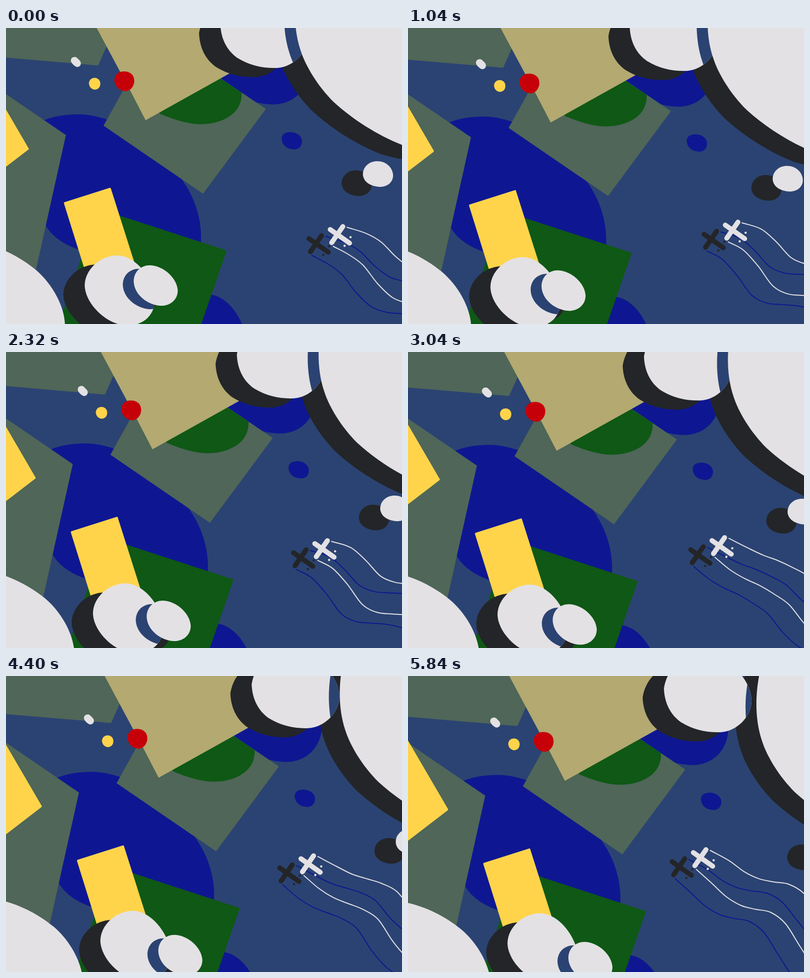
These frames come from a looping animation (800x600 px, 5.92 s). An HTML page with a canvas:

```html
<!DOCTYPE html>
<html lang="en">
<head>
<meta charset="utf-8">
<title>Planes over islands</title>
<style>
  html, body { margin: 0; width: 100%; height: 100%; overflow: hidden; background: #2b4372; }
  canvas { display: block; }
</style>
</head>
<body>
<canvas id="stage" width="800" height="600"></canvas>
<script>
const ctx = document.getElementById('stage').getContext('2d');
const STEP = 80, STEPS = 74, WAVE_STEPS = 16;
const SEA = '#2b4372', BLUE = '#0e1791', SAGE = '#4f6658', GREEN = '#0f5815',
      TAN = '#b3a971', YELLOW = '#ffd44b', RED = '#c60009', WHITE = '#e3e1e4', DARK = '#232528';

const shape = (color, d, round = 0) => ({ color, path: new Path2D(d), round });

const ground = [
  shape(BLUE, 'M150 175C240 178 330 260 365 322C385 355 396 395 394 435C390 470 200 470 147 449C110 437 85 415 75 390C40 300 30 200 82 185C105 177 125 175 150 175Z'),
  shape(BLUE, 'M612 80C612 125 580 155 540 155C500 155 425 130 425 90L500 20L612 60Z'),
  shape(BLUE, 'M400 540C440 536 475 575 490 640H380Z'),
  shape(BLUE, 'M557 226C556 214 566 211 575 211C588 211 599 220 598 231C597 243 588 247 580 246C568 245 558 238 557 226Z'),
  shape(SAGE, 'M-60 55L186 76L235 -34H-60Z'),
  shape(SAGE, 'M-60 93L121 217L30 628H-60Z'),
  shape(SAGE, 'M197 198L398 336L525 164L320 25H293Z'),
  shape(GREEN, 'M311 174C345 188 370 195 395 195C440 194 478 172 476 131L430 100L300 150Z'),
  shape(TAN, 'M148 -66L251 127L282 187L500 65L470 -80Z'),
  shape(GREEN, 'M187 368L444 452L379 640H95Z', 3),
  shape(YELLOW, 'M-60 66L44 245L-60 325Z', 4),
  shape(YELLOW, 'M119 355L210 326L267 506H166Z', 4),
  shape(WHITE, 'M131 66C131 59 139 57 143 60L149 66C154 72 150 79 144 79C140 79 131 71 131 66Z'),
  shape(YELLOW, 'M167.500 112C168 104 174 101 180 101C187 102 191 107 190.500 114C190 121 185 125 179 125C172 124 168 119 167.500 112Z'),
  shape(RED, 'M219 105C220 94 227 88 238 88C250 88 258 94 259 105C260 116 253 127 242 128C231 128 219 119 219 105Z'),
];

// Each cloud drifts by its own vector over one loop.
const cloud = (dx, dy, d) => ({ dx, dy, path: new Path2D(d) });
const topCloud = cloud(84, 33, 'M433 -8C434 20 445 45 468 61C492 76 520 82 548 81C580 79 610 50 610 17C609 -10 595 -30 580 -45C540 -95 445 -85 433 -8Z');
const cornerCloud = cloud(120, 86, 'M590 -90C582 -50 580 0 595 45C605 77 630 118 662 150C700 185 750 217 800 237C830 246 850 250 880 250V-120H620Z');
const leftCloud = cloud(48, 24, 'M-80 431C-20 436 30 465 60 490C95 520 118 565 119 600C121 615 121 640 118 660H-80Z');
const lowCloud = cloud(42, 20, 'M159 522C159 490 190 461 225 461C262 461 300 510 301 550C300 585 275 603 245 603C205 603 160 560 159 522Z');
const puff = cloud(66, 58, 'M258 514C258 492 275 480 292 481C318 482 346 507 347 532C347 552 330 564 312 563C285 561 259 540 258 514Z');
const rightPuff = cloud(88, 53, 'M721 297C721 280 735 270 750 270C768 270 782 283 782 300C781 315 768 322 755 322C736 321 722 312 721 297Z');
const clouds = [topCloud, cornerCloud, leftCloud, lowCloud, puff, rightPuff];

// Trail depth at every 30 px behind the plane, at key phases of the wave.
const waveKeys = [
  [0,      [0, 16, 38, 76, 104, 115, 118, 119, 121, 125]],
  [0.125,  [0, 21, 35, 57, 98, 125, 132, 134, 134, 136]],
  [0.4375, [0, 26, 45, 57, 69, 89, 134, 168, 187, 202]],
  [0.5625, [0, 27, 55, 73, 81, 87, 110, 157, 201, 218]],
  [0.84,   [0, 15, 48, 91, 108, 111, 111, 113, 122, 140]],
];
waveKeys.push([1, waveKeys[0][1]]);

function waveAt(phase) {
  const i = waveKeys.findIndex(key => key[0] > phase);
  const [from, a] = waveKeys[i - 1], [to, b] = waveKeys[i];
  const k = (phase - from) / (to - from);
  return a.map((y, j) => y + (b[j] - y) * k);
}

function moved(dx, dy, draw) {
  ctx.save();
  ctx.translate(dx, dy);
  draw();
  ctx.restore();
}

function fill(path, color) {
  ctx.fillStyle = color;
  ctx.fill(path);
}

function drawCloud(c, p, color, ox = 0, oy = 0) {
  moved(c.dx * p + ox, c.dy * p + oy, () => fill(c.path, color));
}

// Shade that a higher cloud casts on a lower one.
function castShade(upper, lower, p) {
  ctx.save();
  const clip = new Path2D();
  clip.addPath(lower.path, new DOMMatrix().translate(lower.dx * p, lower.dy * p));
  ctx.clip(clip);
  drawCloud(upper, p, SEA, -22, 7);
  ctx.restore();
}

function drawTrail(x0, y0, wave, gap, scale) {
  const pts = wave.map((y, i) => [x0 + (i ? gap + 30 * i : 0), y0 + y * scale]);
  const slope = i => {
    const a = pts[Math.max(i - 1, 0)], b = pts[Math.min(i + 1, pts.length - 1)];
    return (b[1] - a[1]) / (b[0] - a[0]);
  };
  ctx.beginPath();
  ctx.moveTo(...pts[0]);
  for (let i = 1; i < pts.length; i++) {
    const [ax, ay] = pts[i - 1], [bx, by] = pts[i], h = (bx - ax) / 3;
    ctx.bezierCurveTo(ax + h, ay + slope(i - 1) * h, bx - h, by - slope(i) * h, bx, by);
  }
  ctx.lineWidth = 2;
  ctx.stroke();
}

const planeBars = new Path2D('M680.500 402.500L658 435M655 408.500L694 436');
const planeDots = new Path2D('M698.300 424a2.300 2.300 0 1 1-4.600 0a2.300 2.300 0 1 1 4.600 0M686.300 441.500a2.300 2.300 0 1 1-4.600 0a2.300 2.300 0 1 1 4.600 0');

function drawPlane(wave, trailColor, color) {
  ctx.lineCap = 'round';
  ctx.strokeStyle = trailColor;
  drawTrail(689, 404, wave, 9, 0.79);
  drawTrail(661, 442.5, wave, 0, 1);
  ctx.strokeStyle = color;
  ctx.lineWidth = 10;
  ctx.stroke(planeBars);
  fill(planeDots, color);
}

function render(step) {
  const p = step / (STEPS - 1);
  const wave = waveAt(step % WAVE_STEPS / WAVE_STEPS);
  const planeX = -78.5 * p, planeY = -50.5 * p;
  ctx.fillStyle = SEA;
  ctx.fillRect(0, 0, 800, 600);

  moved(35 * p, 25.6 * p, () => {
    for (const s of ground) {
      fill(s.path, s.color);
      if (!s.round) continue;
      ctx.lineJoin = 'round';
      ctx.lineWidth = s.round;
      ctx.strokeStyle = s.color;
      ctx.stroke(s.path);
    }
  });

  clouds.forEach(c => drawCloud(c, p, DARK, -43, 18.5));
  moved(planeX - 43, planeY + 18.5, () => drawPlane(wave, BLUE, DARK));

  drawCloud(topCloud, p, WHITE);
  castShade(cornerCloud, topCloud, p);
  drawCloud(cornerCloud, p, WHITE);
  drawCloud(leftCloud, p, WHITE);
  drawCloud(lowCloud, p, WHITE);
  castShade(puff, lowCloud, p);
  drawCloud(puff, p, WHITE);
  drawCloud(rightPuff, p, WHITE);
  moved(planeX, planeY, () => drawPlane(wave, WHITE, WHITE));
}

const start = performance.now();
function tick() {
  render(Math.floor((performance.now() - start) / STEP) % STEPS);
  requestAnimationFrame(tick);
}
tick();
</script>
</body>
</html>
```
